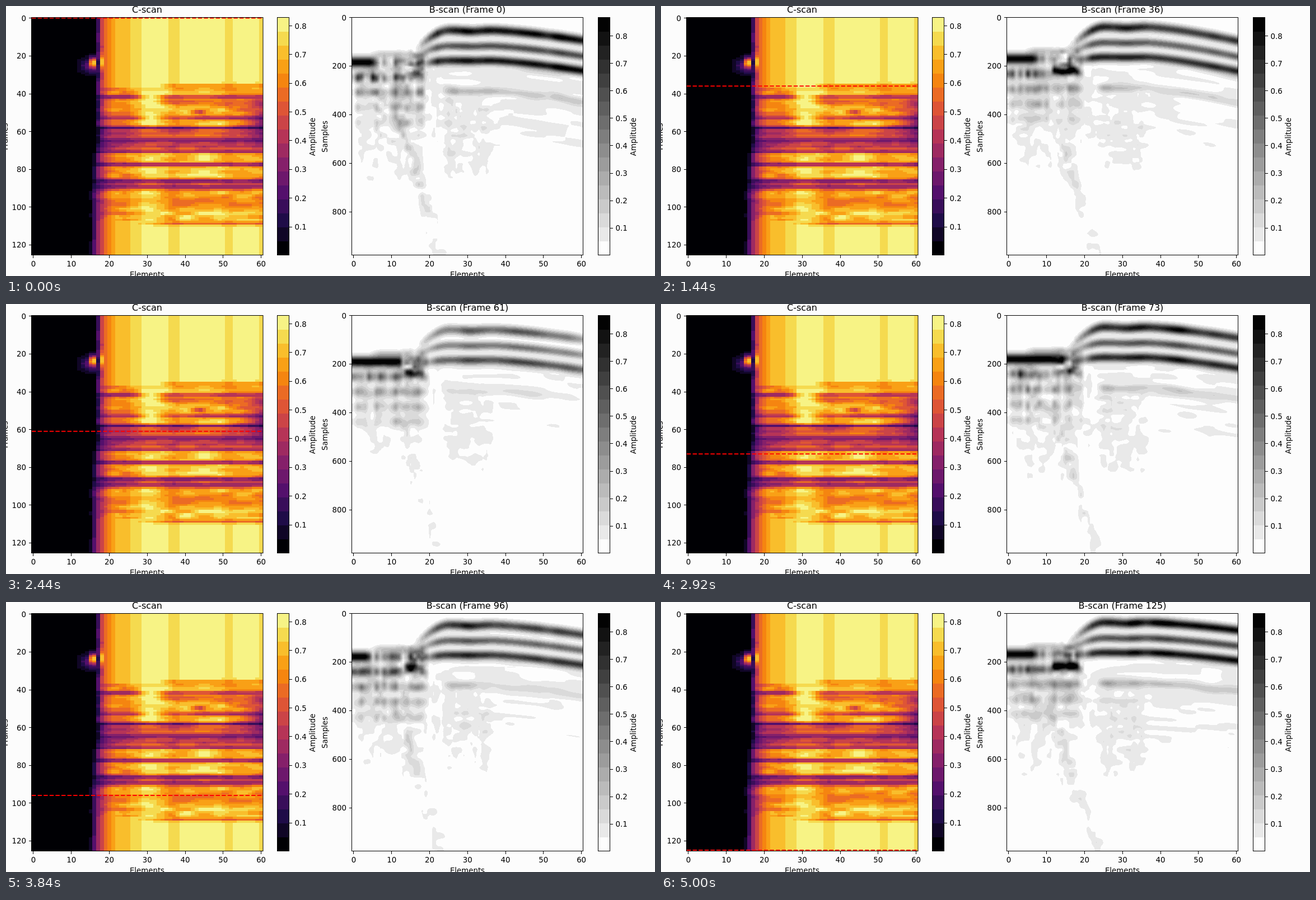
An HTML page with a canvas that plays this animation: 1159x483 px, repeating every 5040 ms.

```html
<!DOCTYPE html>
<html lang="en">
<head>
<meta charset="utf-8">
<title>C-scan and B-scan</title>
<style>
html, body { margin: 0; width: 100%; height: 100%; overflow: hidden; background: #fcfcfc; }
canvas { display: block; }
</style>
</head>
<body>
<canvas id="stage" width="1159" height="483"></canvas>
<script>
const COLS = 61, ROWS = 126, BANDS = 17, STEP = 40;
const TOP = 20.5, HEIGHT = 425, WIDTH = 413;
const FONT = '"DejaVu Sans", sans-serif';

const clamp = v => Math.max(0, Math.min(1, v));
const bump = (d, s) => Math.exp(-(d / s) * (d / s));
const mix = (a, b, t) => a + (b - a) * t;

// Piecewise linear path through rows that start with their position x.
function along(points, x) {
  const i = Math.max(1, points.findIndex(p => p[0] >= x));
  const a = points[i - 1], b = points[i], t = (x - a[0]) / (b[0] - a[0]);
  return a.map((v, k) => mix(v, b[k], t));
}

function hash(x, y, z) {
  let h = Math.imul(x, 374761393) ^ Math.imul(y, 668265263) ^ Math.imul(z, 1274126177);
  h = Math.imul(h ^ (h >>> 13), 1103515245);
  h = Math.imul(h ^ (h >>> 15), 2246822519);
  return ((h ^ (h >>> 14)) >>> 0) / 4294967296;
}

// Smooth value noise, stretched to fill 0..1.
function noise(x, y, z) {
  const X = Math.floor(x), Y = Math.floor(y), Z = Math.floor(z);
  const ease = t => t * t * (3 - 2 * t);
  const u = ease(x - X), v = ease(y - Y), w = ease(z - Z);
  const line = (j, k) => mix(hash(X, j, k), hash(X + 1, j, k), u);
  const plane = k => mix(line(Y, k), line(Y + 1, k), v);
  return clamp((mix(plane(Z), plane(Z + 1), w) - .15) / .7);
}

// Colour scales
const infernoStops = [
  [0, 0, 0, 4], [.125, 32, 12, 74], [.25, 87, 16, 110], [.375, 138, 34, 106], [.5, 188, 55, 84],
  [.625, 228, 90, 49], [.75, 249, 142, 9], [.875, 249, 203, 53], [.94, 242, 232, 103], [1, 252, 255, 164]
];
const levels = Array.from({ length: BANDS }, (_, i) => i);
const inferno = levels.map(i => `rgb(${along(infernoStops, i / 16.5).slice(1).map(Math.round)})`);
const greyLevel = levels.map(i => Math.round(mix(253, 3, clamp((i + .3 * Math.sign(i)) / 16.3))));
const greys = greyLevel.map(g => `rgb(${g},${g},${g})`);
const band = (v, max) => Math.max(0, Math.min(BANDS - 1, Math.floor(v / max * BANDS)));

// Dark rows of the C-scan: row, half width, depth
const darkRows = [
  [35.5, .9, .25], [41.5, 1, .45], [44.5, 2.5, .2], [52.7, 1, .42], [58, .9, .6], [60.5, 2, .33],
  [64.7, 2, .58], [68, 1.6, .38], [70.6, .9, .55], [77.5, 1.1, .57], [86.4, 1.3, .6],
  [89.5, 1.5, .5], [97, 3.5, .2], [108.8, 1, .35]
];

function peak(r, c) {
  let v = (c > 28 ? .815 : .775) / (1 + Math.exp((17.3 - c) / 1.9));
  for (const dip of [24, 37, 51.5, 60.5]) v -= .055 * bump(c - dip, 1.7);
  const edge = mix(16, 14.6, clamp((r - 60) / 30)) + .6 * (noise(0, r / 5, 4) - .5);
  v *= clamp((c - edge) / 2);
  for (const [row, w, depth] of darkRows) {
    const reach = depth < .4 && (row < 56 || row > 92) ? clamp((c - 26) / 11) : 1;
    const spared = row < 56 ? 1 - bump(c - 31, 3) : 1;
    v *= 1 - depth * bump(r - row, w) * reach * spared;
  }
  if (r > 36 && r < 108) {
    v *= 1 - .2 * noise(c / 5, r / 2.2, 9) * (1 - .7 * bump(c - 31, 3));
    v *= 1 - .5 * clamp((c - 50) / 10) * bump(r - 54, 10);
    v *= 1 - .4 * bump(c - 43.5, 1.6) * bump(r - 49.5, 1);
  }
  // Bright spot at the border
  if (c < 17) v = Math.max(v, .34 * bump(c - 16.2, 3.6) * bump(r - 25, 4));
  v = Math.max(v, .85 * bump(c - 15.6, 1) * bump(r - 23.7, 3.2));
  v += .26 * bump(c - 18, .6) * bump(r - 23, 3.4);
  return v * (1 - .45 * bump(c - 17, .5) * bump(r - 23.5, 2.5));
}
const scan = Array.from({ length: ROWS }, (_, r) =>
  Array.from({ length: COLS }, (_, c) => peak(r, c)));

// Key poses of the B-scan: frame, crest y, drop to the right, end of dark echo, cluster strength
const poses = [
  [0, 43, 18, 5, .45], [36, 37, 25, 7, .87], [50, 50, 15, 10.5, .8], [73, 41, 19, 15, .5],
  [86, 40, 18, 1.5, .6], [108, 41, 17, 7, .8], [125, 36, 14, 7, .9]
];

function column(f, c, tail) {
  const [, crest, drop, darkEnd, cluster] = along(poses, f);
  const lift = 45 * clamp((25 - c) / 10) ** 1.7 + 2 * bump(c - 31, 3);
  const sag = c > 36 ? drop * ((c - 36) / 24) ** 1.4 : 0;
  const top = crest + sag, echoY = crest + 57, clusterY = echoY + 21;
  const level = scan[f][c] * (.9 + .16 * noise(c / 3, f / 5, 7));

  // Surface bands as [y, strength, half width]
  const bands = [
    [top + lift, 1.05 * level * clamp((c - 13) / 9), 8.3],
    [top + lift * .5 + 28, (.2 + .5 * level) * clamp((c - 15) / 7), 7.5],
    [top + lift * .25 + 54, (.22 + .73 * level) * clamp((c - 17) / 5), 8],
    [top + 109, level * level * (.25 + .2 * bump(c - 26, 2)) * clamp((c - 23) / 1.5), 7]
  ];
  // Echoes on the left, each weaker and broken up by column
  const left = clamp((20 - c) / 2);
  const rough = k => .15 + 1.3 * noise(c * 1.2, 3 + k, f / 8);
  const inCluster = clamp(c - 14.5 + 9 * (cluster - .5)) * clamp((19 - c) / 1.5);
  bands.push(
    [echoY, left * mix(.4 * rough(0), .9, clamp(darkEnd - c + .5)), 9.5],
    [clusterY, inCluster * cluster, 8.5],
    [echoY - 14, left * .17 * clamp((c - 4) / 3), 7]
  );
  for (let k = 1; k < 5; k++) {
    const hidden = k === 1 ? inCluster : 0;
    bands.push([echoY + 27 * k, left * (1 - hidden) * .7 * rough(k * .3) * .62 ** k, 9]);
  }

  const wl = clamp((20 - c) / 3) * clamp(.3 + c / 4), wr = clamp((c - 21) / 3);
  const mid = clamp((c - 23) / 2) * clamp((37 - c) / 2);
  const out = new Float32Array(HEIGHT);
  for (let j = 0; j < HEIGHT; j++) {
    const y = 21 + j;
    let v = 0;
    for (const [by, strength, w] of bands) {
      if (Math.abs(y - by) < 26) v += strength * bump(y - by, w);
    }
    if (c > 11 && c < 20) {
      const checker = noise(c * 1.1, y / 8, f / 4) - .5;
      v = Math.max(0, v + .6 * checker * bump(c - 15.5, 3) * bump(y - echoY - 8, 24));
    }
    if (y > 90) {
      const n = noise(c * .85, y / 11, f / 8);
      const flat = noise(c * .17, (y - sag) / 8, f / 9 + 50);
      const gate = clamp((y - 98) / 18);
      const path = 10 + 13 * clamp((y - 180) / 265) ** .85;
      const spread = 1.2 + Math.max(0, y - 230) / 120;
      const haze = wl * .12 * clamp((400 - y) / 300) * (.15 + 1.5 * n)
        + wr * .065 * clamp(1 - ((y - 100) / 235) ** 2) * (.35 + 1.1 * flat)
        + mid * .07 * n * clamp((350 - y) / 80) * clamp((y - 140) / 30)
        + .1 * n * bump(c - 20.8, 1.8) * clamp((310 - y) / 90)
        + .115 * n * bump(c - path, spread) * clamp((y - 175) / 20);
      v += haze * gate * tail;
    }
    out[j] = v;
  }
  return out;
}

const ctx = document.getElementById('stage').getContext('2d');
const image = ctx.createImageData(WIDTH, HEIGHT);

function drawBscan(f) {
  const row = scan[f].slice(25, 56);
  const tail = .3 + .9 * row.reduce((a, b) => a + b) / row.length;
  const data = Array.from({ length: COLS }, (_, c) => column(f, c, tail));
  for (let i = 0; i < WIDTH; i++) {
    const x = Math.max(0, Math.min(COLS - 1.001, (i + .5) * COLS / WIDTH - .5));
    const c = Math.floor(x), u = x - c, a = data[c], b = data[c + 1];
    for (let j = 0; j < HEIGHT; j++) {
      const g = greyLevel[band(mix(a[j], b[j], u), .867)], p = (j * WIDTH + i) * 4;
      image.data[p] = image.data[p + 1] = image.data[p + 2] = g;
      image.data[p + 3] = 255;
    }
  }
  ctx.putImageData(image, 618, 21);
}

// Static parts
const back = document.createElement('canvas');
back.width = 1159;
back.height = 483;
const pen = back.getContext('2d');

function label(g, text, x, y, align = 'center', size = 13.33) {
  g.font = `${size}px ${FONT}`;
  g.textAlign = align;
  g.fillStyle = '#000';
  g.fillText(text, x, y);
}
function upright(text, x, y) {
  pen.save();
  pen.translate(x, y);
  pen.rotate(-Math.PI / 2);
  label(pen, text, 0, 0);
  pen.restore();
}
function tick(x, y, w, h) {
  pen.fillStyle = '#000';
  pen.fillRect(Math.round(x - .5), Math.round(y - .5), w, h);
}
function frame(g, x, w) {
  g.strokeStyle = '#000';
  g.lineWidth = 1;
  g.strokeRect(x, TOP, w, HEIGHT);
}
function axes(x, last, step, yPlace, yName, nameX) {
  for (let v = 0; v <= 60; v += 10) {
    const px = x + (v + .5) * 413.5 / COLS;
    tick(px, 446, 1, 5);
    label(pen, v, px, 466);
  }
  for (let v = 0; v <= last; v += step) {
    tick(x - 4.5, yPlace(v), 5, 1);
    label(pen, v, x - 9.5, yPlace(v) + 5, 'right');
  }
  label(pen, 'Elements', x + 206.5, 485);
  upright(yName, nameX, 233.5);
}
function colorbar(x, w, colors, y8, unit) {
  colors.forEach((color, i) => {
    pen.fillStyle = color;
    pen.fillRect(x, 445 - (i + 1) * 25, w, 26);
  });
  frame(pen, x, w);
  for (let k = 1; k <= 8; k++) {
    const y = y8 + (8 - k) * unit;
    tick(x + w + .5, y, 5, 1);
    label(pen, (k / 10).toFixed(1), x + w + 10, y + 5, 'left');
  }
  upright('Amplitude', x + 67, 234);
}

pen.fillStyle = '#fcfcfc';
pen.fillRect(0, 0, 1159, 483);
const cellX = c => Math.round(46 + c * WIDTH / COLS);
const cellY = r => Math.round(21 + r * 424 / ROWS);
scan.forEach((row, r) => row.forEach((v, c) => {
  pen.fillStyle = inferno[band(v, .829)];
  pen.fillRect(cellX(c), cellY(r), cellX(c + 1) - cellX(c), cellY(r + 1) - cellY(r));
}));
axes(45.5, 120, 20, v => 21.8 + v * 3.38, 'Frames', 3);
axes(617.5, 800, 200, v => 20.5 + v * .4348, 'Samples', 573.5);
colorbar(484.5, 21, inferno, 35.5, 51.36);
colorbar(1057.5, 21, greys, 53.5, 49.1);
label(pen, 'C-scan', 252, 11.5, 'center', 16);

function draw(f) {
  ctx.drawImage(back, 0, 0);
  drawBscan(f);
  const y = 21.5 + f * 3.38;
  ctx.strokeStyle = '#f00';
  ctx.lineWidth = 2;
  ctx.setLineDash([7.4, 3.2]);
  ctx.beginPath();
  ctx.moveTo(46, y);
  ctx.lineTo(459, y);
  ctx.stroke();
  ctx.setLineDash([]);
  frame(ctx, 45.5, 413.5);
  frame(ctx, 617.5, 413);
  label(ctx, `B-scan (Frame ${f})`, 824, 11.5, 'center', 16);
}

const start = performance.now();
let shown = -1;
function run() {
  const f = Math.floor(Math.max(0, performance.now() - start) / STEP) % ROWS;
  if (f !== shown) draw(shown = f);
  requestAnimationFrame(run);
}
run();
</script>
</body>
</html>
```
